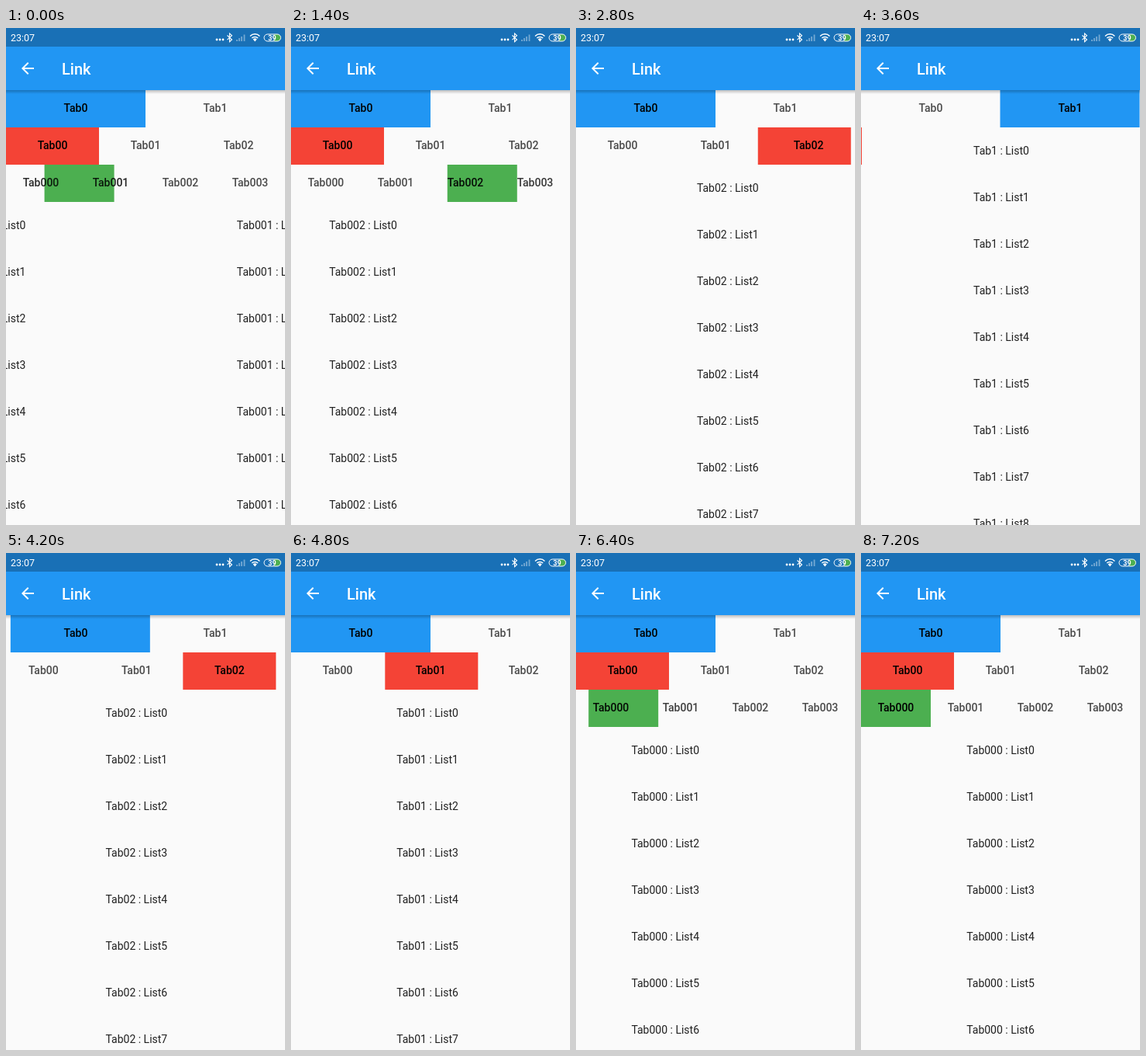
Animation, 360 px wide and 640 px high, one loop 7.4 s. Source, as an HTML page:

```html
<!DOCTYPE html>
<html lang="en">
<head>
<meta charset="utf-8">
<title>Linked tabs</title>
<style>
  html, body { margin: 0; width: 100%; height: 100%; overflow: hidden; background: #fafafa; }
  svg { display: block; width: 360px; height: 640px; font-family: Roboto, "Open Sans", sans-serif; }
  .tab { font-size: 14px; font-weight: 500; text-anchor: middle; }
  .item { font-size: 14px; text-anchor: middle; fill-opacity: .87; }
</style>
</head>
<body>
<svg id="stage" viewBox="0 0 360 640">
  <defs>
    <linearGradient id="shade" x1="0" y1="0" x2="0" y2="1">
      <stop offset="0" stop-opacity=".24"/>
      <stop offset="1" stop-opacity="0"/>
    </linearGradient>
  </defs>
  <rect width="360" height="640" fill="#fafafa"/>
  <g id="body"></g>
  <rect y="80" width="360" height="5" fill="url(#shade)"/>
  <rect width="360" height="80" fill="#2196f3"/>
  <rect width="360" height="24" fill="#1970b6"/>
  <path transform="translate(16 40)" fill="#fff" d="M20 11H7.83l5.59-5.59L12 4l-8 8 8 8 1.41-1.41L7.83 13H20z"/>
  <text x="72" y="59.5" font-size="20" font-weight="500" fill="#fff">Link</text>
  <g id="status" fill="#fff">
    <text x="6" y="17" font-size="12.5">23:07</text>
    <circle cx="272" cy="15" r="1.4"/>
    <circle cx="276" cy="15" r="1.4"/>
    <circle cx="280" cy="15" r="1.4"/>
    <path d="M285.5 9.5l6 5.5-3 2.700V7l3 2.700-6 5.500" fill="none" stroke="#fff" stroke-width="1.100"/>
    <path d="M298 17v-2M301 17v-4M304 17v-6M307.500 17V8.500" stroke="#fff" stroke-opacity=".4" stroke-width="1.800"/>
    <path d="M315 10.500a8.600 8.600 0 0 1 12.400 0M317.300 13a5.500 5.500 0 0 1 7.800 0" fill="none" stroke="#fff" stroke-width="1.500"/>
    <path d="M318.700 14.500a3.500 3.500 0 0 1 5 0l-2.500 3z"/>
    <path d="M346 8h4a4.500 4.500 0 0 1 0 9h-4z" fill="#4caf50"/>
    <rect x="333" y="8" width="21.500" height="9" rx="4.500" fill="none" stroke="#fff"/>
    <text x="343.500" y="15.700" font-size="9" font-weight="700" text-anchor="middle">39</text>
  </g>
</svg>
<script>
const LOOP = 7400, STEP = 100, WIDTH = 360, TAB_HEIGHT = 48, ROW = 60;

function add(parent, tag, attrs = {}, text = '') {
  const el = document.createElementNS('http://www.w3.org/2000/svg', tag);
  for (const key in attrs) el.setAttribute(key, attrs[key]);
  el.textContent = text;
  parent.append(el);
  return el;
}

function addList(page, name, top) {
  for (let i = 0; top + i * ROW < 640; i++)
    add(page, 'text', { class: 'item', x: WIDTH / 2, y: top + i * ROW + 35 }, `${name} : List${i}`);
}

// A tab row with pages below it; the first page may hold another such view.
function tabView(parent, prefix, count, top, color) {
  const tabWidth = WIDTH / count;
  const indicator = add(parent, 'rect', { y: top, width: tabWidth, height: TAB_HEIGHT, fill: color });
  const track = add(parent, 'g');
  const labels = [], pages = [];
  for (let i = 0; i < count; i++) {
    labels.push(add(parent, 'text', { class: 'tab', x: (i + .5) * tabWidth, y: top + 28 }, prefix + i));
    pages.push(add(track, 'g', { transform: `translate(${i * WIDTH})` }));
  }
  return {
    pages,
    list(i) { addList(pages[i], prefix + i, top + TAB_HEIGHT); },
    show(position) {
      indicator.setAttribute('x', position * tabWidth);
      track.setAttribute('transform', `translate(${-position * WIDTH})`);
      labels.forEach((label, i) => {
        const selected = Math.max(0, 1 - Math.abs(position - i));
        label.setAttribute('fill-opacity', .7 + .3 * selected);
      });
    }
  };
}

const outer = tabView(document.getElementById('body'), 'Tab', 2, 80, '#2196f3');
const middle = tabView(outer.pages[0], 'Tab0', 3, 128, '#f44336');
const inner = tabView(middle.pages[0], 'Tab00', 4, 176, '#4caf50');
outer.list(1);
[1, 2].forEach(middle.list);
[0, 1, 2, 3].forEach(inner.list);

// Swipes: start, duration, direction.
const swipes = [
  [outer, [[2950, 719, 1], [3720, 620, -1]]],
  [middle, [[1790, 500, 1], [2300, 668, 1], [4340, 544, -1], [4830, 400, -1]]],
  [inner, [[210, 500, 1], [720, 480, 1], [1301, 500, 1],
           [5230, 430, -1], [5650, 430, -1], [6080, 557, -1]]]
];

// A quick drag that settles softly.
function swipe(u) {
  u = Math.min(1, Math.max(0, u));
  return 1 - (1 - u ** 1.5) ** 3;
}

function render(ms) {
  const time = Math.min(7200, Math.max(400, Math.floor(ms / STEP) * STEP));
  for (const [view, moves] of swipes)
    view.show(moves.reduce((sum, [start, length, dir]) => sum + dir * swipe((time - start) / length), 0));
}

const begin = performance.now();
function tick() {
  render((performance.now() - begin) % LOOP);
  requestAnimationFrame(tick);
}
tick();
</script>
</body>
</html>
```
